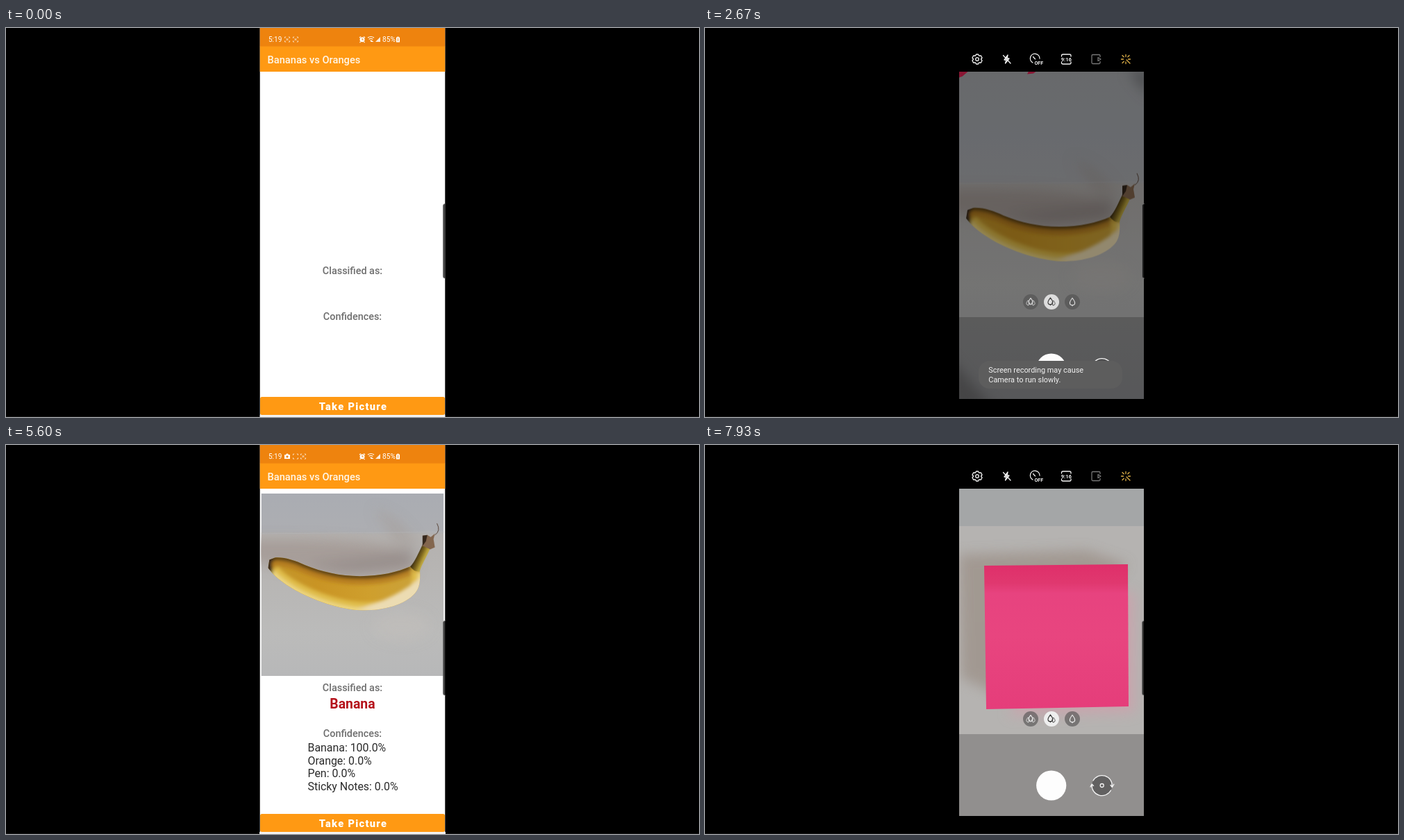
An HTML page for the animation above (8000 ms loop, 998 px wide and 561 px high).

```html
<!DOCTYPE html>
<html lang="en">
<head>
<meta charset="utf-8">
<title>Fruit classifier</title>
<style>
html, body { margin: 0; width: 100%; height: 100%; overflow: hidden; background: #000; }
#stage { display: block; width: 100vw; height: 100vh; font-family: Roboto, "Noto Sans", sans-serif; }
.line { fill: none; stroke: #f4f4f4; stroke-width: 1.3; stroke-linecap: round; stroke-linejoin: round; }
.mid { text-anchor: middle; }
.label { font-weight: 500; font-size: 14.4px; fill: #6e6e6e; text-anchor: middle; }
.row { font-size: 15.9px; fill: #2b2b2b; }
</style>
</head>
<body>
<svg id="stage" viewBox="0 0 998 561">
  <defs>
    <clipPath id="phone"><rect x="365.7" width="266.6" height="561"/></clipPath>
    <filter id="soft" x="-50%" y="-50%" width="200%" height="200%"><feGaussianBlur stdDeviation="9"/></filter>
    <filter id="blur" x="-20%" y="-40%" width="140%" height="180%"><feGaussianBlur stdDeviation="2.5"/></filter>
    <linearGradient id="wall" x2="0" y2="1">
      <stop stop-color="#a8aaad"/><stop offset=".2" stop-color="#a9acb2"/><stop offset=".335" stop-color="#adaeb2"/>
      <stop offset=".345" stop-color="#b4b1af"/><stop offset=".65" stop-color="#bbbbba"/>
      <stop offset="1" stop-color="#b1b2b6"/>
    </linearGradient>
    <linearGradient id="peel" gradientUnits="userSpaceOnUse" x1="380" y1="0" x2="600" y2="0">
      <stop stop-color="#c2962c"/><stop offset=".3" stop-color="#c99424"/>
      <stop offset=".65" stop-color="#cf9f2d"/><stop offset="1" stop-color="#c9a23c"/>
    </linearGradient>
    <linearGradient id="stem" gradientUnits="userSpaceOnUse" x1="591" y1="240" x2="606" y2="247">
      <stop stop-color="#3f3013"/><stop offset=".4" stop-color="#80691f"/><stop offset=".7" stop-color="#b7a03c"/><stop offset="1" stop-color="#c8b55c"/>
    </linearGradient>
    <linearGradient id="pad" x2="0" y2="1">
      <stop stop-color="#df2f6a"/><stop offset=".13" stop-color="#e0386f"/>
      <stop offset=".2" stop-color="#e7437f"/><stop offset=".5" stop-color="#e8457f"/><stop offset="1" stop-color="#e53d7a"/>
    </linearGradient>
    <path id="topEdge" d="M378 244L386 241C400 240 415 245 430 252C455 262 480 268 510 268C540 268 565 262 583 254"/>
    <path id="bottomEdge" d="M598 262C598 275 597 285 590 293C575 310 545 318 515 318C480 317 440 302 415 288C398 278 388 270 381 262"/>
    <clipPath id="skin"><path d="M378 244L386 241C400 240 415 245 430 252C455 262 480 268 510 268C540 268 565 262 583 254L597 257C598 275 597 285 590 293C575 310 545 318 515 318C480 317 440 302 415 288C398 278 388 270 381 262L376 256Z"/></clipPath>

    <g id="bananaPhoto">
      <rect x="366" y="44" width="266" height="474" fill="url(#wall)"/>
      <g filter="url(#soft)">
        <path d="M350 214C430 214 520 212 585 232L590 262L480 272L350 246Z" fill="#a0958f" opacity=".7"/>
        <path d="M430 250Q510 272 588 250L590 230L540 238Z" fill="#8d8482" opacity=".6"/>
        <path d="M530 170Q570 180 596 226L566 225Z" fill="#a59e9c" opacity=".6"/>
        <path d="M350 455L420 535H350Z" fill="#807e80" opacity=".75"/>
        <path d="M610 44H640V80Z" fill="#77797d"/>
        <ellipse cx="570" cy="340" rx="42" ry="22" fill="#c4c0bb" opacity=".5"/>
      </g>
      <path d="M366 206L632 203.5" stroke="#b9b9bb" stroke-width="1" opacity=".6"/>
      <path d="M366 44H379L371 51L366 53ZM466 44H477L473 47L464 48Z" fill="#df2454"/>
      <g clip-path="url(#skin)" fill="none">
        <rect x="370" y="236" width="234" height="86" fill="url(#peel)"/>
        <g filter="url(#blur)">
          <use href="#bottomEdge" stroke="#e0bd4c" stroke-width="24"/>
          <use href="#bottomEdge" stroke="#ecd682" stroke-width="8"/>
          <path d="M505 316Q565 300 600 268V300L560 324Z" fill="#ecdcb2"/>
          <use href="#topEdge" y="8" stroke="#b0741a" stroke-width="9" opacity=".7"/>
          <use href="#topEdge" stroke="#5c4314" stroke-width="8"/>
          <path d="M372 238H386L381 250L383 266L372 262Z" fill="#32271a"/>
        </g>
      </g>
      <path d="M583 254C590 247 596 232 601 222L612 228C607 240 600 250 597 261Q590 263 583 254Z" fill="url(#stem)"/>
      <path d="M601 209L608 208L613 211L619 206L617 214L619 226L612 229L604 225L600 224L604 216Z" fill="#83664e"/>
      <path d="M601 209L608 208L606 217L601 224Z" fill="#35271c"/>
      <path d="M619 208Q628 202 622 191" fill="none" stroke="#5a463a" stroke-width="1"/>
    </g>

    <g id="frameIcon" fill="none" stroke="#fff" stroke-width=".9" opacity=".8">
      <path d="M-3.5-1.8V-3.5H-1.8M1.8-3.5H3.5V-1.8M3.5 1.8V3.5H1.8M-1.8 3.5H-3.5V1.8"/>
    </g>
    <path id="cross" d="M-1.6-1.6L1.6 1.6M1.6-1.6L-1.6 1.6" stroke="#fff" stroke-width=".9" opacity=".8"/>
    <path id="leaf" d="M0-5.5C2-3 3.6-.6 3.6 1.4A3.6 3.2 0 0 1-3.6 1.4C-3.6-.6-2-3 0-5.5ZM0 4.6V6.2" fill="none" stroke-width="1.2"/>
  </defs>

  <rect y="560" width="998" height="1" fill="#161616"/>
  <g clip-path="url(#phone)">
    <g id="home">
      <rect x="365" width="268" height="561" fill="#fff"/>
      <rect x="365" width="268" height="27" fill="#ee830e"/>
      <rect x="365" y="26.5" width="268" height="36.5" fill="#ff9913"/>
      <g fill="#fff">
        <text x="378" y="20" font-size="10">5:19</text>
        <text x="542" y="20" font-size="10.2">85%</text>
        <g id="iconsBefore">
          <use href="#frameIcon" x="405" y="16.5"/><use href="#cross" x="405" y="16.5"/>
          <use href="#frameIcon" x="417" y="16.5"/><use href="#cross" x="417" y="16.5"/>
        </g>
        <g id="iconsAfter">
          <path d="M401 14H403L404 12.6H406L407 14H409V20H401Z"/><circle cx="405" cy="16.8" r="1.6" fill="#ee830e"/>
          <use href="#frameIcon" x="417" y="16.5"/>
          <use href="#frameIcon" x="428" y="16.5"/><use href="#cross" x="428" y="16.5"/>
        </g>
        <circle cx="513" cy="16.7" r="3.5"/>
        <path d="M509 14L511 12.4M517 14L515 12.4M510.5 20L509.5 21M515.5 20L516.5 21" stroke="#fff" stroke-width="1.2"/>
        <path d="M513 14.8V17H514.6" fill="none" stroke="#ee830e"/>
        <path d="M521 14Q525.5 11 530 14M522.7 16.2Q525.5 14.3 528.3 16.2" fill="none" stroke="#fff" stroke-width="1.1"/>
        <path d="M524 18L526 17.5L529.5 20H526Z"/>
        <path d="M532 20L539 13V20Z" opacity=".85"/>
        <path d="M562 13.5H563.5V12.5H565.5V13.5H567V20.5H562Z"/>
        <path d="M564.5 14.5V19" stroke="#ee830e"/>
        <text x="376.5" y="50.5" font-size="14.65" font-weight="500" fill="#fff6e8">Bananas vs Oranges</text>
      </g>
      <text class="label" x="499" y="355">Classified as:</text>
      <text class="label" x="499" y="421">Confidences:</text>
      <g id="results">
        <svg x="367.5" y="70" width="263" height="263" viewBox="366 147.5 266 266"><use href="#bananaPhoto"/></svg>
        <text class="mid" x="499" y="379.5" font-size="19.4" font-weight="700" fill="#b5121b">Banana</text>
        <text class="row" x="434.5" y="442">Banana: 100.0%</text>
        <text class="row" x="434.5" y="460.5">Orange: 0.0%</text>
        <text class="row" x="434.5" y="479">Pen: 0.0%</text>
        <text class="row" x="434.5" y="497.5">Sticky Notes: 0.0%</text>
      </g>
      <rect x="365" y="558" width="268" height="3" fill="#f3f3f3"/>
      <rect x="366" y="532" width="266" height="26" rx="2.5" fill="#ff9913"/>
      <rect id="ripple" y="532" height="26" rx="2.5" fill="#fff"/>
      <text class="mid" x="500" y="550.5" font-size="14.6" font-weight="900" letter-spacing="1.3" fill="#fff">Take Picture</text>
    </g>

    <g id="camera">
      <rect x="365" width="268" height="560" fill="#000"/>
      <g id="preview">
        <svg id="bananaView" x="366" y="63" width="266" height="472" viewBox="366 44.5 266 472"><use href="#bananaPhoto"/></svg>
        <svg id="noteView" x="366" y="63" width="266" height="472" viewBox="366 63 266 472">
          <rect x="366" y="63" width="266" height="472" fill="#b5b3b1"/>
          <rect id="band" x="366" y="63" width="266" fill="#a4a6a7"/>
          <path id="shade" fill="#9b9087" opacity=".75" filter="url(#soft)"/>
          <path id="glow" fill="#d99aaa" opacity=".55" filter="url(#soft)"/>
          <path id="note" fill="url(#pad)"/>
        </svg>
        <rect x="366" y="417" width="266" height="118" fill="#000" opacity=".2"/>
        <rect id="dim" x="366" y="63" width="266" height="472" fill="#000"/>
      </g>
      <g id="controls">
        <g class="line">
          <path d="M390.5 38H393.5L394.5 40L397.5 40L399 43L397.5 45L399 47L397.5 50H394.5L393.5 52H390.5L389.5 50L386.5 50L385 47L386.5 45L385 43L386.5 40H389.5Z"/>
          <circle cx="392" cy="45" r="2.3"/>
          <path d="M436 39L431 46H434L432.5 51L438 44H435ZM429.5 39.5L440 51"/>
          <path d="M472 50A6.8 6.8 0 1 1 482 44M472.5 41.5L475.5 44.8"/>
          <path d="M513.5 41V40Q513.5 38 515.5 38H525Q527 38 527 40V41M513.5 49V50Q513.5 52 515.5 52H525Q527 52 527 50V49"/>
          <path stroke="#777" d="M569 41.5V40Q569 38.5 567.5 38.5H558.5Q557 38.5 557 40V50Q557 51.5 558.5 51.5H567.5Q569 51.5 569 50V48.5M566 42.5L570 45L566 47.5Z"/>
          <path stroke="#dfb048" d="M607 46L612 51M606 38.5V41.5M599.5 45H602.5M601 39.5L603.2 41.7M611 39.5L608.8 41.7M609.5 45H612.5M601 50.5L603.2 48.3M606 49V51.5"/>
        </g>
        <g fill="#f4f4f4" font-weight="700" class="mid">
          <text x="480.8" y="52.5" font-size="7">OFF</text>
          <text x="520.3" y="47.8" font-size="7.6">9:16</text>
        </g>
        <g id="zoom">
          <circle cx="469" cy="395" r="11" fill="#444" fill-opacity=".55"/>
          <circle cx="499" cy="395" r="11" fill="#eee"/>
          <circle cx="529" cy="395" r="11" fill="#444" fill-opacity=".55"/>
          <g stroke="#eee">
            <use href="#leaf" transform="translate(465.2 396.4) scale(.65)"/>
            <use href="#leaf" transform="translate(472.8 396.4) scale(.65)"/>
            <use href="#leaf" transform="translate(469 394.3) scale(.85)"/>
            <use href="#leaf" x="529" y="395"/>
          </g>
          <g stroke="#333">
            <use href="#leaf" transform="translate(497.4 394.3) scale(.95)"/>
            <use href="#leaf" transform="translate(501.8 396.6) scale(.65)"/>
          </g>
        </g>
      </g>
      <g id="buttons">
        <circle id="shutter" cx="498.7" cy="491" r="21.6" fill="#fdfdfd"/>
        <circle id="flipFill" cx="571.7" cy="491" r="14.5" fill="#444" fill-opacity=".6"/>
        <path class="line" stroke-width="1.5" d="M559 484A14.6 14.6 0 0 1 586.3 492M584.5 498A14.6 14.6 0 0 1 557.1 490M555 493L557.1 489L559.5 491.5M584 490.5L586.3 493.5L588.8 489.3"/>
        <circle class="line" cx="571.7" cy="491" r="2.5"/>
      </g>
      <g id="toast">
        <rect x="394" y="480" width="207" height="40" rx="16" fill="#5d5d5d"/>
        <g font-size="10.9" fill="#f2f2f2">
          <text x="408.3" y="497.3">Screen recording may cause</text>
          <text x="408.3" y="510.8">Camera to run slowly.</text>
        </g>
      </g>
    </g>

    <g id="review">
      <rect x="365" width="268" height="560" fill="#000"/>
      <rect id="edge" x="366" width="266" height="1" fill="#b0620f"/>
      <svg x="366" y="44.5" width="266" height="472.5" viewBox="366 44.5 266 472.5"><use href="#bananaPhoto"/></svg>
      <g font-size="12.2" fill="#fff" class="mid">
        <text x="432.6" y="517.3">Retry</text>
        <text x="565.2" y="517.3">OK</text>
      </g>
    </g>
    <rect x="629.4" y="253.5" width="8" height="107.5" rx="3" fill="#000" fill-opacity=".75" stroke="#808080" stroke-width=".7"/>
  </g>
</svg>

<script>
const LOOP = 8000;
const el = Object.fromEntries([...document.querySelectorAll('[id]')].map(e => [e.id, e]));
const ramp = (t, a, b) => Math.min(1, Math.max(0, (t - a) / (b - a)));
const smooth = k => k * k * (3 - 2 * k);
const mix = (a, b, k) => a + (b - a) * k;
const set = (id, attrs) => { for (const a in attrs) el[id].setAttribute(a, attrs[a]); };
const fade = (id, v) => set(id, { opacity: v, display: v > 0 ? 'inline' : 'none' });
const show = (id, on) => fade(id, on ? 1 : 0);
const polygon = points => 'M' + points.map(p => p.join(' ')).join('L') + 'Z';

const NOTE_FAR = [[420, 217], [587, 219], [584, 383], [418, 384]];
const NOTE_NEAR = [[402, 174], [609, 172], [610, 377], [405, 381]];

function drawNote(k) {
  const p = NOTE_FAR.map(([x, y], i) => [mix(x, NOTE_NEAR[i][0], k), mix(y, NOTE_NEAR[i][1], k)]);
  const [tl, tr, br, bl] = p;
  set('note', { d: polygon(p) });
  set('glow', { d: polygon([[tr[0] - 20, tr[1] + 40], [tr[0] + 9, tr[1] + 40], [br[0] + 9, br[1] + 9], [bl[0] + 30, bl[1] + 9]]) });
  set('shade', { d: polygon([[tl[0] - 36, tl[1] - 16], [tr[0] - 60, tr[1] - 20], tr, [bl[0] + 20, bl[1] - 20], [bl[0] - 36, bl[1] - 45]]) });
  set('band', { height: mix(79, 54, k) });
}

function drawRipple(t, start) {
  const k = smooth(ramp(t, start, start + 200));
  set('ripple', { x: 499 - 133 * k, width: 266 * k });
  fade('ripple', k && 0.28 * (1 - ramp(t, start + 200, start + 400)));
}

function render(t) {
  const second = t >= 5000;
  const returned = t >= 3820;

  show('results', returned);
  show('iconsBefore', !returned);
  show('iconsAfter', returned);
  drawRipple(t, second ? 6530 : 1400);

  // camera opens twice; the first launch is slower
  const opened = second ? ramp(t, 6680, 6840) : ramp(t, 1600, 1780);
  const live = second ? t >= 7060 : t >= 2270;
  const dim = second ? 1 - ramp(t, 7030, 7160) : 1 - ramp(t, 2300, 2900);
  show('home', opened < 1 || (returned && !second));
  fade('camera', second || t < 3300 ? opened : 0);
  show('buttons', second ? t >= 6880 : t >= 1850);
  show('preview', live);
  show('controls', live);
  show('flipFill', live);
  show('bananaView', live && !second);
  show('noteView', live && second);
  fade('dim', live ? dim : 0);
  fade('zoom', live ? 1 - dim * 0.35 : 0);
  fade('toast', second ? 0 : ramp(t, 2400, 2560));
  set('shutter', { r: 21.6 - (second ? 0 : 2 * Math.sin(Math.PI * ramp(t, 3130, 3290))) });
  drawNote(smooth(ramp(t, 7150, 7930)));

  fade('review', t < 3300 ? 0 : 1 - ramp(t, 3820, 3960));
  show('edge', t >= 3760 && t < 3960);
}

function tick(now) {
  render(now % LOOP);
  requestAnimationFrame(tick);
}
render(0);
requestAnimationFrame(tick);
</script>
</body>
</html>
```
